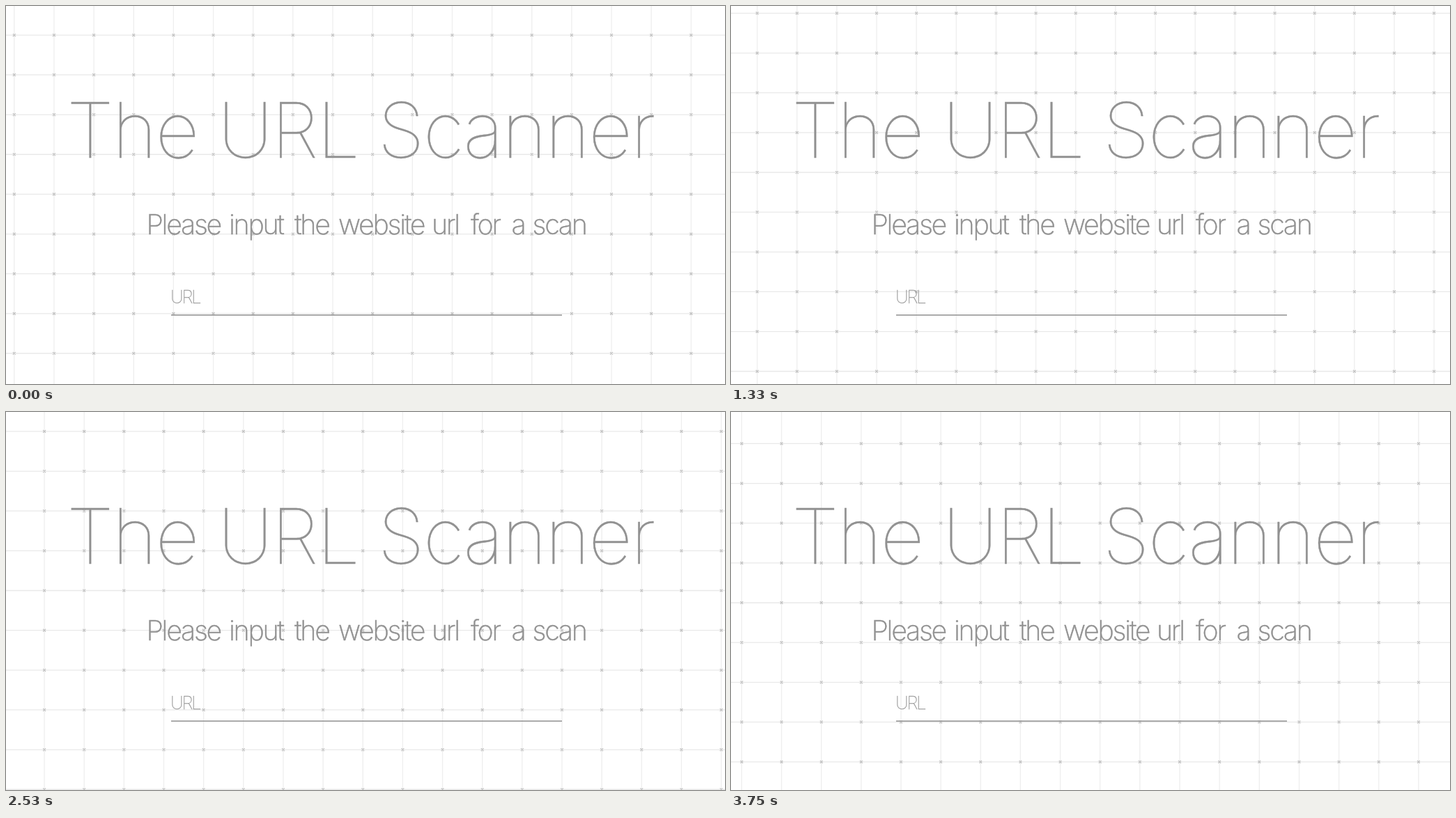
Animation of 1032 by 543 pixels, one loop 3810 ms. Source, as an HTML page:

```html
<!DOCTYPE html>
<html lang="en">
<head>
<meta charset="utf-8">
<title>The URL Scanner</title>
<style>
  html, body { margin: 0; width: 100%; height: 100%; overflow: hidden; background: #fff; }
  svg { display: block; width: 1032px; height: 543px; }
  text { font-family: Inter, Roboto, sans-serif; fill: #919191; stroke: #919191; white-space: pre; }
  .title { font-size: 110px; font-weight: 100; letter-spacing: -2.2px; stroke-width: .4px; }
  .lead { font-size: 39.5px; font-weight: 200; letter-spacing: -2.3px; stroke-width: .5px; }
  .label { font-size: 26px; font-weight: 100; letter-spacing: -2.3px; stroke-width: .3px; }
  path { fill: none; }
</style>
</head>
<body>
<svg viewBox="0 0 1032 543">
  <g id="grid">
    <path id="cols" stroke="#eeeeee" stroke-width="1.3"/>
    <path id="rows" stroke="#e9e9e9" stroke-width="1.3"/>
    <path id="marks" stroke="#c3c3c3" stroke-width="1.3"/>
  </g>
  <text class="title" y="217.5"><tspan x="87">The </tspan><tspan x="304">URL </tspan><tspan x="533.5">Scanner</tspan></text>
  <text class="lead" y="328"><tspan x="201.5">Please </tspan><tspan x="320">input </tspan><tspan x="414">the </tspan><tspan x="477">website </tspan><tspan x="611">url </tspan><tspan x="667">for </tspan><tspan x="725.5">a </tspan><tspan x="755.5">scan</tspan></text>
  <text class="label" x="236" y="427">URL</text>
  <path d="M237 444H798" stroke="#8f8f8f" stroke-width="1.7"/>
</svg>
<script>
  const LOOP = 3810, CELL = 57.15, STEP = 4.146;
  const START_X = 11.8, START_Y = 41.8;
  const COLS = 20, ROWS = 11;
  const el = id => document.getElementById(id);

  function buildGrid() {
    let cols = '', rows = '', marks = '';
    for (let c = -1; c < COLS; c++) {
      const x = c * CELL;
      cols += `M${x} ${-CELL}V${ROWS * CELL}`;
      for (let r = -1; r < ROWS; r++) {
        const y = r * CELL;
        marks += `M${x - 1.9} ${y - 1.9}l3.8 3.8m0 -3.8l-3.8 3.8`;
      }
    }
    for (let r = -1; r < ROWS; r++) rows += `M${-CELL} ${r * CELL}H${COLS * CELL}`;
    el('cols').setAttribute('d', cols);
    el('rows').setAttribute('d', rows);
    el('marks').setAttribute('d', marks);
  }

  // Steps last 60, 60, 80 ms; every 26th step drops one short beat.
  function stepStart(n) {
    if (n === 0) return 0;
    const k = n - 1, r = k % 26;
    return 70 + 1740 * Math.floor(k / 26) + 200 * Math.floor(r / 3) + 60 * (r % 3);
  }
  const starts = Array.from({ length: 57 }, (_, n) => stepStart(n));

  function draw(ms) {
    const t = ms % LOOP;
    let n = starts.length - 1;
    while (starts[n] > t) n--;
    const x = (START_X + n * STEP) % CELL;
    const y = (START_Y + n * STEP) % CELL;
    el('grid').setAttribute('transform', `translate(${x} ${y})`);
  }

  buildGrid();
  draw(0);
  const begin = performance.now();
  (function tick() {
    draw(performance.now() - begin);
    requestAnimationFrame(tick);
  })();
</script>
</body>
</html>
```
